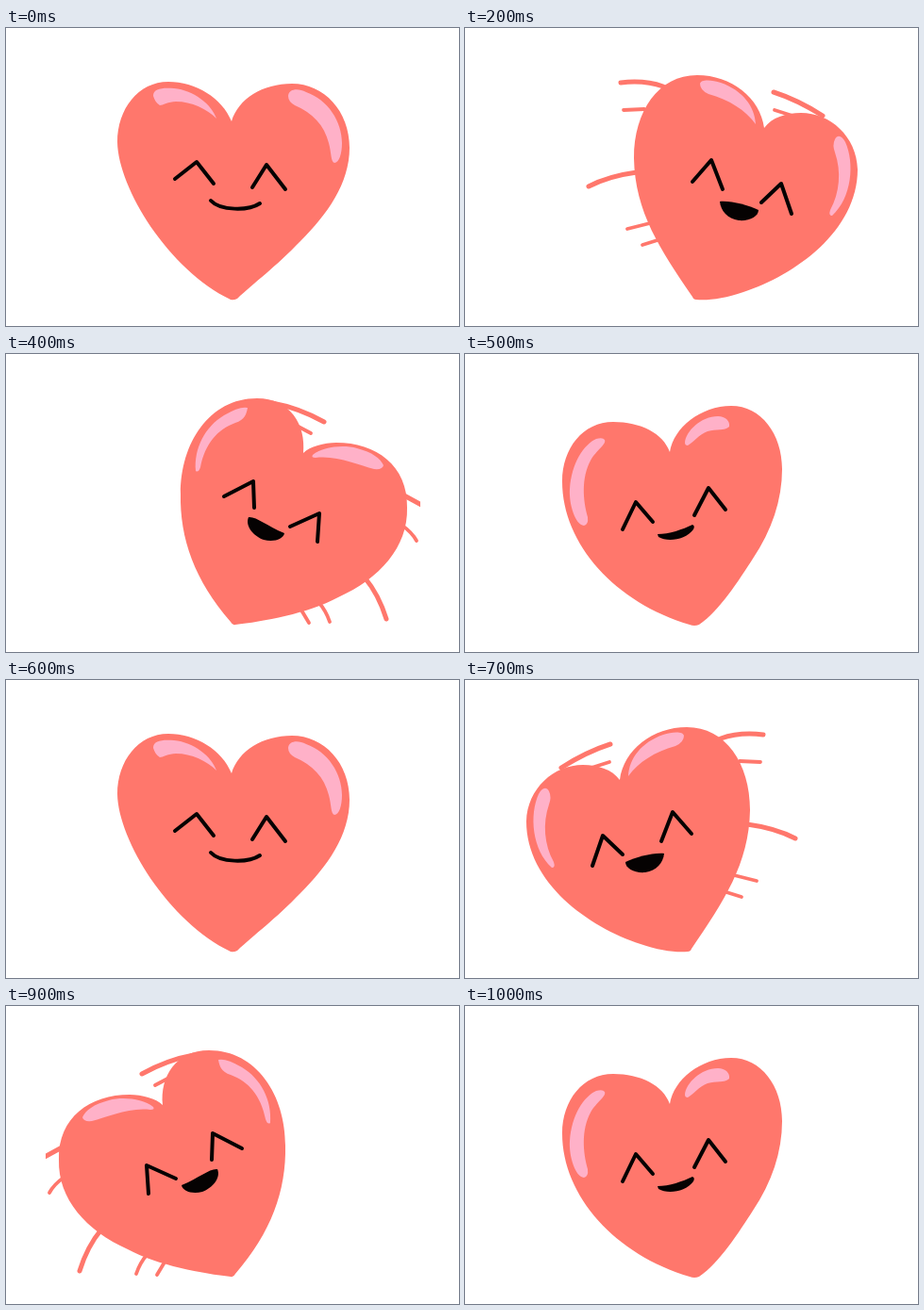
An HTML page with a canvas for the animation above (1100 ms loop, 480x316 px).

```html
<!DOCTYPE html>
<html lang="en">
<head>
<meta charset="utf-8">
<title>Dancing heart</title>
<style>
  html, body { margin: 0; width: 100%; height: 100%; overflow: hidden; background: #fff; }
  canvas { display: block; }
</style>
</head>
<body>
<canvas id="stage" width="480" height="316"></canvas>
<script>
const ctx = document.getElementById('stage').getContext('2d');
const STEP = 100, CORAL = '#ff776c', PINK = '#ffb1c8', INK = '#050202';
const TIP = [241, 287], MIRROR = 481;

const rest = {
  body: 'M239 99C229 74 201 57 172 57C140 57 118 86 118 121C119 170 172 256 238 288Q241 289 245 287C263 270 285 254 312 226C340 198 364 165 364 127C364 88 337 59 303 59C272 59 246 75 239 99Z',
  shine: 'M156 72C156 64 166 63 178 64C199 66 218 81 223 96C213 86 197 78 180 78C172 78 166 82 163 82Q158 79 156 72Z' +
    'M299 72C300 64 310 64 318 68C341 76 356 99 356 122C356 133 353 143 348 143C344 142 345 133 342 122C337 103 325 90 306 82Q299 78 299 72Z',
  eyes: 'M179 160L202 142L220 165M261 169L276 145L296 171',
  smile: 'M217 183C227 194 257 194 269 186'
};

const sway = {
  body: 'M217 104C210 84 186 72 157 72C125 72 103 100 103 135C103 202 160 264 238 287Q243 289 248 287C270 272 290 240 305 217C325 187 336 155 336 122C336 85 314 55 282 55C250 55 221 78 217 104Z',
  shine: 'M148 91C150 96 139 102 133 113C123 132 125 155 130 173Q131 181 126 182C117 181 110 160 111 143C113 115 126 96 139 90Q146 88 148 91Z' +
    'M233 94C234 82 250 66 268 66C276 66 281 71 280 77C275 82 266 79 257 82C248 85 242 94 236 97Q233 97 233 94Z',
  eyes: 'M167 186L181 157L199 178M243 171L258 142L276 165',
  mouth: 'M204 191C216 191 231 186 241 181Q244 182 242 186C234 197 215 200 205 194Z'
};

const swing = {
  body: 'M317 106C313 74 282 50 246 50C205 50 179 88 179 138C180 195 207 235 241 285Q242 288 245 288C258 289 275 287 295 280C350 262 416 215 416 150C415 115 387 90 356 90C340 90 325 95 317 106Z',
  shine: 'M249 59C250 54 262 55 271 58C294 66 307 83 308 102C297 87 280 76 258 70Q249 66 249 59Z' +
    'M392 118C395 112 400 115 403 121C413 143 410 180 389 199Q385 199 387 193C397 175 399 152 392 132Q389 124 392 118Z',
  eyes: 'M241 163L261 140L273 171M314 185L335 165L346 197',
  mouth: 'M270 184C282 183 300 188 311 193C311 200 301 205 290 204C278 202 271 194 270 184Z',
  thick: 'M165 58Q190 55 210 62M131 168Q152 157 182 153M327 68Q352 76 379 93',
  thin: 'M168 87L190 86M172 213L196 207M188 230L204 225M328 87L350 94'
};

const lean = {
  body: 'M315 105C318 75 301 47 266 47C215 47 185 95 185 148C184 196 200 240 238 284Q240 288 243 287C271 284 321 275 352 258C396 238 426 205 425 163C426 118 392 94 350 94C337 94 322 98 315 105Z',
  shine: 'M256 57C255 63 253 70 243 73C224 80 211 95 206 120Q204 126 201 124C199 100 211 77 231 65Q248 55 256 57Z' +
    'M325 107C336 98 358 96 372 100C388 104 397 111 400 118Q399 123 390 122C374 118 350 107 328 110Q323 110 325 107Z',
  eyes: 'M231 151L262 135L263 163M301 183L332 169L330 199',
  mouth: 'M257 173C265 172 276 182 295 190C294 196 284 200 273 197C262 193 253 182 257 173Z'
};

const peak = { ...lean, tilt: 2 };
const rebound = {
  ...lean,
  thick: 'M282 52Q310 57 337 72M420 149L444 162M380 237Q395 255 403 281',
  thin: 'M306 75L323 84M420 182Q430 189 435 198M331 263Q339 272 343 284M312 270L321 285'
};

const flip = pose => ({ ...pose, flipped: true });
const poses = [
  rest, flip(sway), swing, peak, rebound, sway,
  rest, flip(swing), flip(peak), flip(rebound), sway
];

function fill(path, color) {
  ctx.fillStyle = color;
  ctx.fill(new Path2D(path));
}

function stroke(path, color, width) {
  ctx.strokeStyle = color;
  ctx.lineWidth = width;
  ctx.stroke(new Path2D(path));
}

function draw(pose) {
  ctx.fillStyle = '#fff';
  ctx.fillRect(0, 0, 480, 316);
  ctx.save();
  // The artwork is cropped at both sides.
  ctx.beginPath();
  ctx.rect(42, 0, 397, 316);
  ctx.clip();
  if (pose.flipped) ctx.transform(-1, 0, 0, 1, MIRROR, 0);
  if (pose.tilt) {
    ctx.translate(...TIP);
    ctx.rotate(pose.tilt * Math.PI / 180);
    ctx.translate(-TIP[0], -TIP[1]);
  }
  ctx.lineCap = ctx.lineJoin = 'round';
  stroke(pose.thick, CORAL, 5);
  stroke(pose.thin, CORAL, 3.8);
  fill(pose.body, CORAL);
  fill(pose.shine, PINK);
  stroke(pose.eyes, INK, 4);
  stroke(pose.smile, INK, 4);
  fill(pose.mouth, INK);
  ctx.restore();
}

const start = performance.now();
function tick() {
  const step = Math.floor((performance.now() - start) / STEP);
  draw(poses[step % poses.length]);
  requestAnimationFrame(tick);
}
tick();
</script>
</body>
</html>
```
